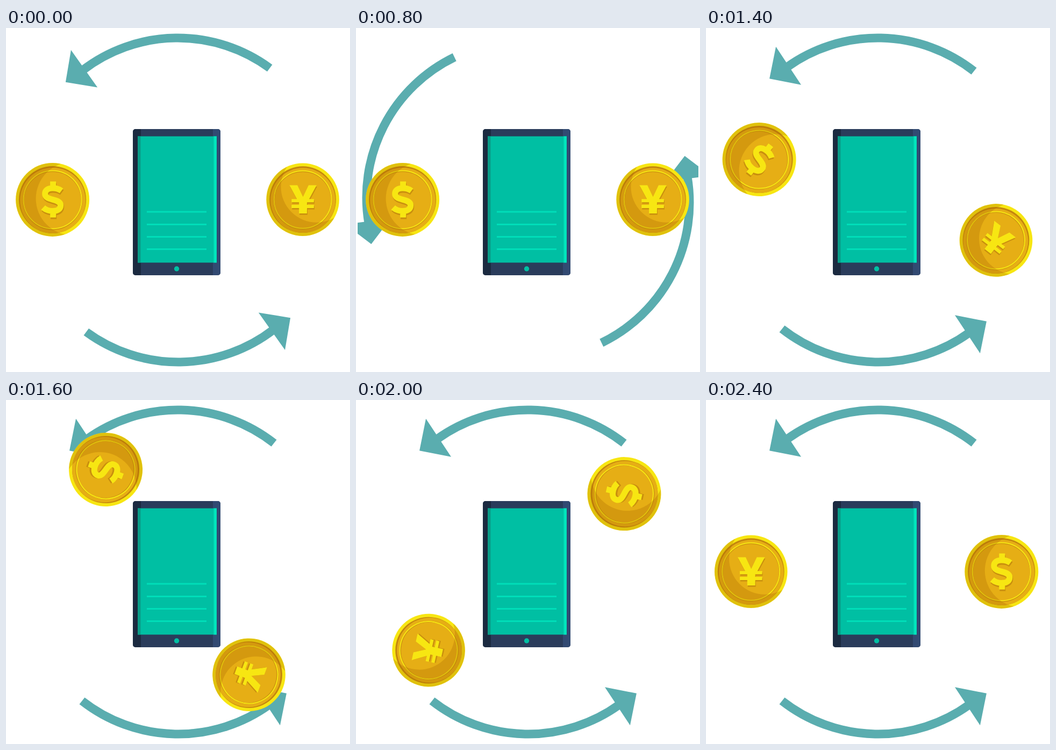
Recreate the animation shown at these times as an HTML page. Size 640 px wide and 640 px high, loop 2500 ms.

```html
<!DOCTYPE html>
<html lang="en">
<head>
<meta charset="utf-8">
<title>Mobile currency exchange</title>
<style>
  html, body { margin: 0; width: 100%; height: 100%; overflow: hidden; background: #fff; }
  svg { display: block; width: 100vw; height: 100vh; }
</style>
</head>
<body>
<svg viewBox="0 0 640 640">
  <defs>
    <clipPath id="frame"><rect x="3" width="634" height="640"/></clipPath>
    <clipPath id="body"><rect x="236" y="188" width="163" height="272" rx="5"/></clipPath>

    <g id="arrow">
      <path d="M170.5-245.5A290 290 0 0 0-178-241" fill="none" stroke="#5aadaf" stroke-width="16"/>
      <path d="M-209.3-219L-199.3-278.8-150-209.3Z" fill="#5aadaf"/>
    </g>

    <g id="coin">
      <circle r="68.5" fill="#f7e612"/>
      <circle r="62.5" fill="#c4850f"/>
      <circle cx=".5" cy="1.5" r="61" fill="#e6ae15"/>
      <circle cy="1" r="54" fill="none" stroke="#c98f0e" stroke-width="2.5"/>
      <circle r="54" fill="none" stroke="#f7e612" stroke-width="2"/>
    </g>
    <mask id="dollarShade">
      <circle r="68.5" fill="#fff"/>
      <circle cx="37" cy="-2" r="68"/>
    </mask>
    <mask id="yenShade">
      <circle r="68.5" fill="#fff"/>
      <circle cx="26" cy="-24" r="67"/>
    </mask>
    <path id="dollarSign" fill="none" stroke-width="11"
      d="M16.5-16.5C7-23.5-14-24-14-11C-14 3 15-3 15 10.5C15 24-8 23.5-17.5 14.500M1-34V-20M1 18V33"/>
    <path id="yenSign"
      d="M-25-27H-10L.5-5 11-27H26L12-1H21V5H8V10H21V16H8V26H-7V16H-21V10H-7V5H-21V-1H-11Z"/>
  </defs>

  <g clip-path="url(#frame)">
    <g id="arrows">
      <use href="#arrow"/>
      <use href="#arrow" transform="rotate(180)"/>
    </g>
  </g>

  <g id="phone">
    <g clip-path="url(#body)">
      <rect x="236" y="188" width="163" height="272" fill="#2a3c5b"/>
      <rect x="236" y="188" width="15" height="272" fill="#1b2a40"/>
      <rect x="385" y="188" width="14" height="272" fill="#324a72"/>
    </g>
    <rect x="245" y="201.5" width="147" height="235" fill="#00bfa3"/>
    <rect x="245" y="201.5" width="5.5" height="235" fill="#0a9c88"/>
    <rect x="386.5" y="201.5" width="5.5" height="235" fill="#00e3bb"/>
    <path d="M262 342H373M262 365.5H373M262 388.5H373M262 411.5H373" stroke="#00deb9" stroke-width="3"/>
    <circle cx="317.5" cy="448" r="4.7" fill="#00bfa3"/>
  </g>

  <g id="dollar">
    <use href="#coin"/>
    <circle r="68.5" fill="#a86400" opacity=".28" mask="url(#dollarShade)"/>
    <use href="#dollarSign" x="1" y="3" stroke="#c98f0e"/>
    <use href="#dollarSign" stroke="#f7e612"/>
  </g>
  <g id="yen">
    <use href="#coin"/>
    <circle r="68.5" fill="#a86400" opacity=".28" mask="url(#yenShade)"/>
    <use href="#yenSign" x="1" y="2.5" fill="#c98f0e"/>
    <use href="#yenSign" fill="#f7e612"/>
  </g>
</svg>
<script>
  const LOOP = 2500, STEP = 100, MOVE = 1200, LEAD = 41;
  const [arrows, dollar, yen] = ['arrows', 'dollar', 'yen'].map(id => document.getElementById(id));

  // Smooth start and stop over one move.
  function ease(time, start) {
    const p = Math.min(1, Math.max(0, (time - start) / MOVE));
    return p * p * (3 - 2 * p);
  }

  // A coin orbits the phone and turns by the same angle on its own axis.
  function orbit(coin, angle, centre, radius, scale) {
    coin.setAttribute('transform',
      `translate(${centre}) rotate(${angle}) translate(${radius}) rotate(${angle}) scale(${scale})`);
  }

  function draw(now) {
    // The motion advances ten times a second.
    const time = Math.floor(now % LOOP / STEP) * STEP;
    const spin = 1.9 - 540 * ease(time, -LEAD);
    const angle = 180 * ease(time, MOVE - LEAD);
    arrows.setAttribute('transform', `translate(320 320) rotate(${spin})`);
    orbit(dollar, angle, '318.2 319.4', -231.6, 1);
    orbit(yen, angle, '317.9 319.2', 234.2, .99);
  }

  const begin = performance.now();
  function tick() {
    draw(performance.now() - begin);
    requestAnimationFrame(tick);
  }
  tick();
</script>
</body>
</html>
```
